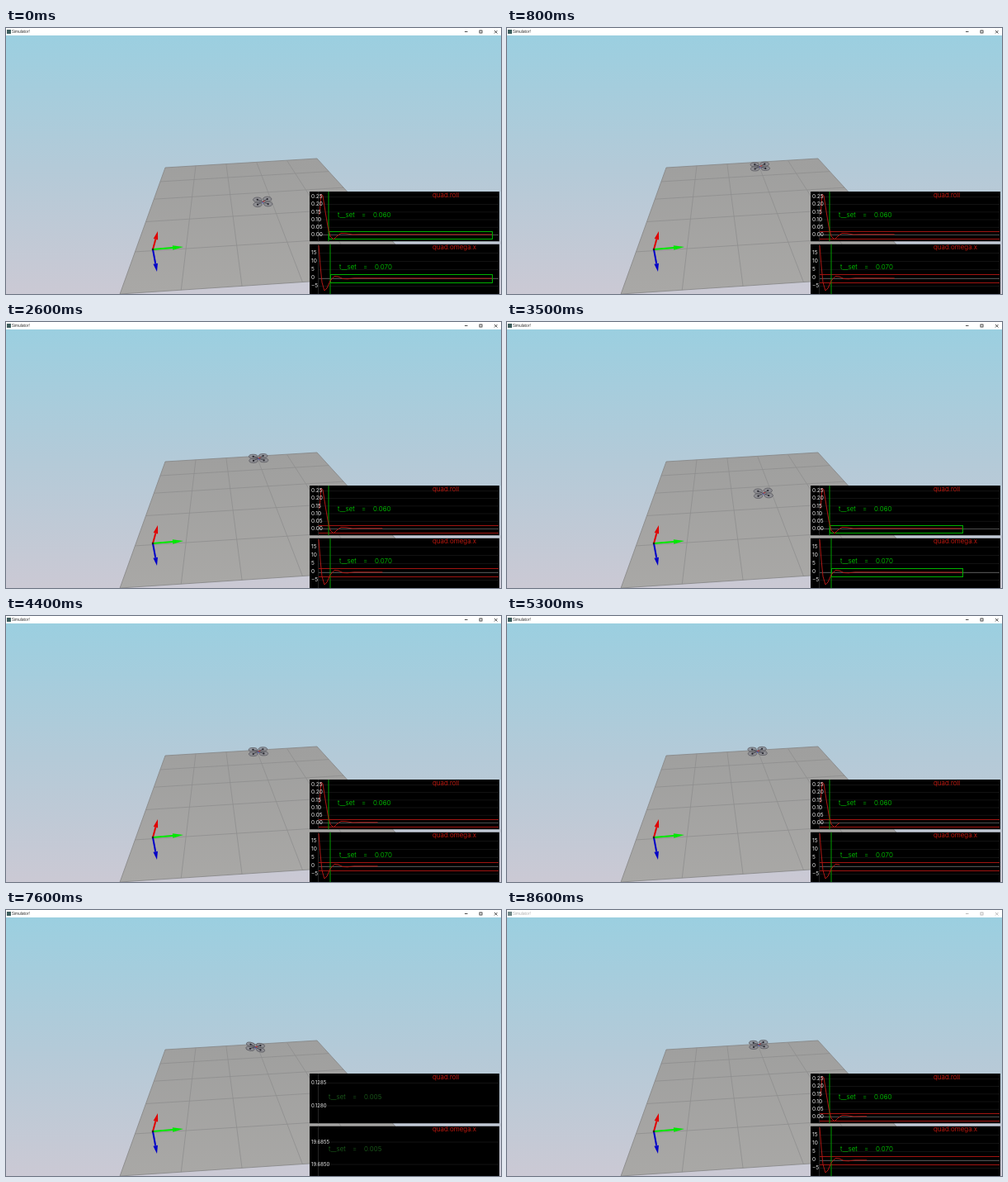
These frames come from a looping animation (600 px wide and 322 px high, 8700 ms). An HTML page with a canvas:

```html
<!DOCTYPE html>
<html lang="en">
<head>
<meta charset="utf-8">
<title>Simulator</title>
<style>
  html, body { margin: 0; width: 100%; height: 100%; overflow: hidden; }
  canvas { display: block; width: 100vw; height: 100vh; }
</style>
</head>
<body>
<canvas id="stage" width="600" height="322"></canvas>
<script>
const ctx = document.getElementById('stage').getContext('2d');
const LOOP = 8700, STEP = 100, TRACE_START = 380;

// Simulation runs: first step, time origin in steps, plot speed in px per step
const runs = [
  { first: 0, origin: -19.35, speed: 10.8 },
  { first: 1, origin: -0.3, speed: 10.8 },
  { first: 19, origin: 18.8, speed: 10.6 },
  { first: 36, origin: 35.7, speed: 8.5 },
  { first: 51, origin: 50.7, speed: 10.1 },
  { first: 71, origin: 70.7, speed: 10.8 },
  { first: 76, origin: 76, speed: 11 },
  { first: 81, origin: 80.8, speed: 10.8 }
];

const plots = [
  { name: 'quad.roll', top: 198, height: 60.5, settle: 391, zero: 250.5, band: [246.5, 255.5],
    ticks: [['0.25', 204], ['0.20', 213], ['0.15', 222.3], ['0.10', 231.5], ['0.05', 240.8], ['0.00', 250]],
    startTicks: [['0.1285', 209], ['0.1280', 236.5]],
    curve: [[380, 226], [382, 201], [384, 203], [387, 222], [390, 240], [393, 252], [397, 256],
            [401, 252], [406, 248.5], [412, 248.7], [420, 250], [430, 249.8], [598, 250]] },
  { name: 'quad.omega.x', top: 261.5, height: 60.5, settle: 393, zero: 303.5, band: [298.5, 308.5],
    ticks: [['15', 272], ['10', 282], ['5', 292], ['0', 302], ['\u22125', 312]],
    startTicks: [['19.6855', 280.5], ['19.6850', 307.5]],
    curve: [[379, 263], [381, 288], [383, 308], [386, 318], [389, 315], [393, 306], [398, 300.5],
            [403, 301], [408, 303.5], [414, 303.8], [422, 302.8], [598, 303.2]] }
];

function line(points, color, width = 1) {
  ctx.beginPath();
  points.forEach(p => ctx.lineTo(...p));
  ctx.strokeStyle = color;
  ctx.lineWidth = width;
  ctx.stroke();
}

function text(str, x, y, size, color, weight = 400) {
  ctx.font = `${weight} ${size}px Inter, Roboto, sans-serif`;
  ctx.textBaseline = 'middle';
  ctx.fillStyle = color;
  ctx.fillText(str, x, y);
}

function ellipse(x, y, rx, ry, fill, stroke) {
  ctx.beginPath();
  ctx.ellipse(x, y, rx, ry, 0, 0, 7);
  ctx.fillStyle = fill;
  ctx.fill();
  if (stroke) {
    ctx.strokeStyle = stroke;
    ctx.lineWidth = 0.8;
    ctx.stroke();
  }
}

function drawWindow(inactive) {
  const sky = ctx.createLinearGradient(0, 9, 0, 322);
  sky.addColorStop(0, '#9bcfe0');
  sky.addColorStop(0.5, '#b3cad8');
  sky.addColorStop(1, '#cbc9d4');
  ctx.fillStyle = sky;
  ctx.fillRect(0, 0, 600, 322);
  ctx.fillStyle = '#fff';
  ctx.fillRect(0, 0, 600, 9);
  ctx.fillStyle = inactive ? '#6f8585' : '#3c5c5c';
  ctx.fillRect(1, 2, 5, 5);
  const ink = inactive ? '#aaa' : '#222';
  text('Simulator!', 7, 4.8, 4.6, ink);
  line([[556, 4.5], [559.5, 4.5]], ink, 0.8);
  ctx.strokeRect(574, 3, 3, 3);
  line([[592, 3], [595.5, 6.5]], ink, 0.8);
  line([[595.5, 3], [592, 6.5]], ink, 0.8);
}

// Perspective map of the unit square onto the ground
function ground(u, v) {
  const w = 1 + 0.007 * u - 0.501 * v;
  return [(193 + 186.6 * u - 124.1 * v) / w, (169 - 9.9 * u - 8.3 * v) / w];
}

function drawGround() {
  const shade = ctx.createLinearGradient(0, 158, 0, 322);
  shade.addColorStop(0, '#9f9f9e');
  shade.addColorStop(1, '#a9a8a6');
  ctx.beginPath();
  [[0, 0], [1, 0], [1, 1], [0, 1]].forEach(c => ctx.lineTo(...ground(...c)));
  ctx.closePath();
  ctx.fillStyle = shade;
  ctx.fill();
  for (let i = 0; i <= 5; i++) {
    const color = i % 5 ? '#8f8f8e' : '#858584';
    line([ground(i / 5, 0), ground(i / 5, 1)], color, 0.8);
    line([ground(0, i / 5), ground(1, i / 5)], color, 0.8);
  }
}

function drawArrow(x, y, color) {
  const ox = 178, oy = 268;
  const length = Math.hypot(x - ox, y - oy), head = length > 30 ? 13 : 10;
  ctx.save();
  ctx.translate(ox, oy);
  ctx.rotate(Math.atan2(y - oy, x - ox));
  line([[0, 0], [length - head, 0]], color, 2);
  ctx.beginPath();
  ctx.moveTo(length, 0);
  ctx.lineTo(length - head, -2.8);
  ctx.lineTo(length - head, 2.8);
  ctx.fillStyle = color;
  ctx.fill();
  ctx.restore();
}

function drawDrone(traceX) {
  const d = traceX - 430;
  const y = Math.min(210.5, 163 + (d < 0 ? 0.0012 : 0.003) * d * d);
  const x = Math.min(310.7, 302 + (traceX - TRACE_START) * 0.048);
  ctx.save();
  ctx.translate(x, y);
  ctx.rotate(0.17 * Math.max(0, 1 - (traceX - TRACE_START) / 14));
  const spread = y > 190 ? 1.15 : 1;
  const rotors = [[-6, -2.3], [6, -3], [-5.7, 2.8], [7, 2.2]].map(([rx, ry]) => [rx, ry * spread]);
  rotors.forEach(([rx, ry]) => ellipse(rx, ry, 5.2, 2.5 * spread, 'rgba(135,135,142,.75)', '#5c5c62'));
  line([rotors[0], rotors[3]], '#4c4c58', 1);
  line([rotors[1], rotors[2]], '#4c4c58', 1);
  rotors.forEach(([rx, ry]) => ellipse(rx, ry, 1.1, 1.1, '#25252c'));
  line([[0, 0], [3, -1.2]], '#c23a3a', 1);
  line([[0, 0], [0.8, 2]], '#3b4cb8', 1);
  ctx.restore();
}

function drawPlot(plot, traceX) {
  const { top, height, zero, band } = plot;
  const bottom = top + height;
  const starting = traceX < TRACE_START + 1;
  const settleX = Math.min(plot.settle, Math.max(TRACE_START, Math.round(traceX)));
  const ticks = starting ? plot.startTicks : plot.ticks;

  ctx.save();
  ctx.beginPath();
  ctx.rect(368, top, 230, height);
  ctx.clip();
  ctx.fillStyle = '#000';
  ctx.fillRect(368, top, 230, height);
  ticks.forEach(([, y]) => line([[379, y + 0.5], [597, y + 0.5]], '#121212'));
  line([[378.5, top], [378.5, bottom]], '#242424');

  if (!starting) {
    line([[379, zero], [597, zero]], '#4d4d4d');
    if (traceX > 525) {
      ctx.strokeStyle = '#00b000';
      ctx.lineWidth = 1;
      ctx.strokeRect(settleX + 0.5, band[0], Math.round(traceX) - settleX, band[1] - band[0]);
    } else {
      band.forEach(y => line([[379, y], [597, y]], '#a01410'));
    }
    line([[settleX, top], [settleX, bottom]], '#00a000');
    ctx.save();
    ctx.beginPath();
    ctx.rect(368, top, traceX - 368, height);
    ctx.clip();
    line(plot.curve, '#b01814');
    ctx.restore();
  }

  ticks.forEach(([label, y]) => text(label, 370, y + 0.5, starting ? 6 : 6.5, '#e8e8e8'));
  text(plot.name, 517, top + 4.5, 8, '#e81c10', 300);
  const green = starting ? '#1f6a1f' : '#00e000';
  const textX = settleX + 11, textY = top + 28.5;
  const settleTime = (settleX - TRACE_START + 1) * 0.005;
  text('t__set', textX, textY, 8, green, 300);
  text('=', textX + 29, textY, 8, green, 300);
  text(settleTime.toFixed(3), textX + 43, textY, 8, green, 300);
  ctx.restore();
}

function draw(now) {
  const step = Math.floor((now % LOOP) / STEP);
  const run = runs.filter(r => r.first <= step).pop();
  const traceX = TRACE_START + (step - run.origin) * run.speed;

  drawWindow(step >= 78);
  drawGround();
  drawArrow(184, 246, '#e00000');
  drawArrow(215, 265, '#00e800');
  drawArrow(183, 295, '#0000c8');
  ellipse(178, 268, 1.3, 1.3, '#222');
  drawDrone(traceX);
  plots.forEach(plot => drawPlot(plot, traceX));
}

const startTime = performance.now();
function tick() {
  draw(performance.now() - startTime);
  requestAnimationFrame(tick);
}
tick();
</script>
</body>
</html>
```
